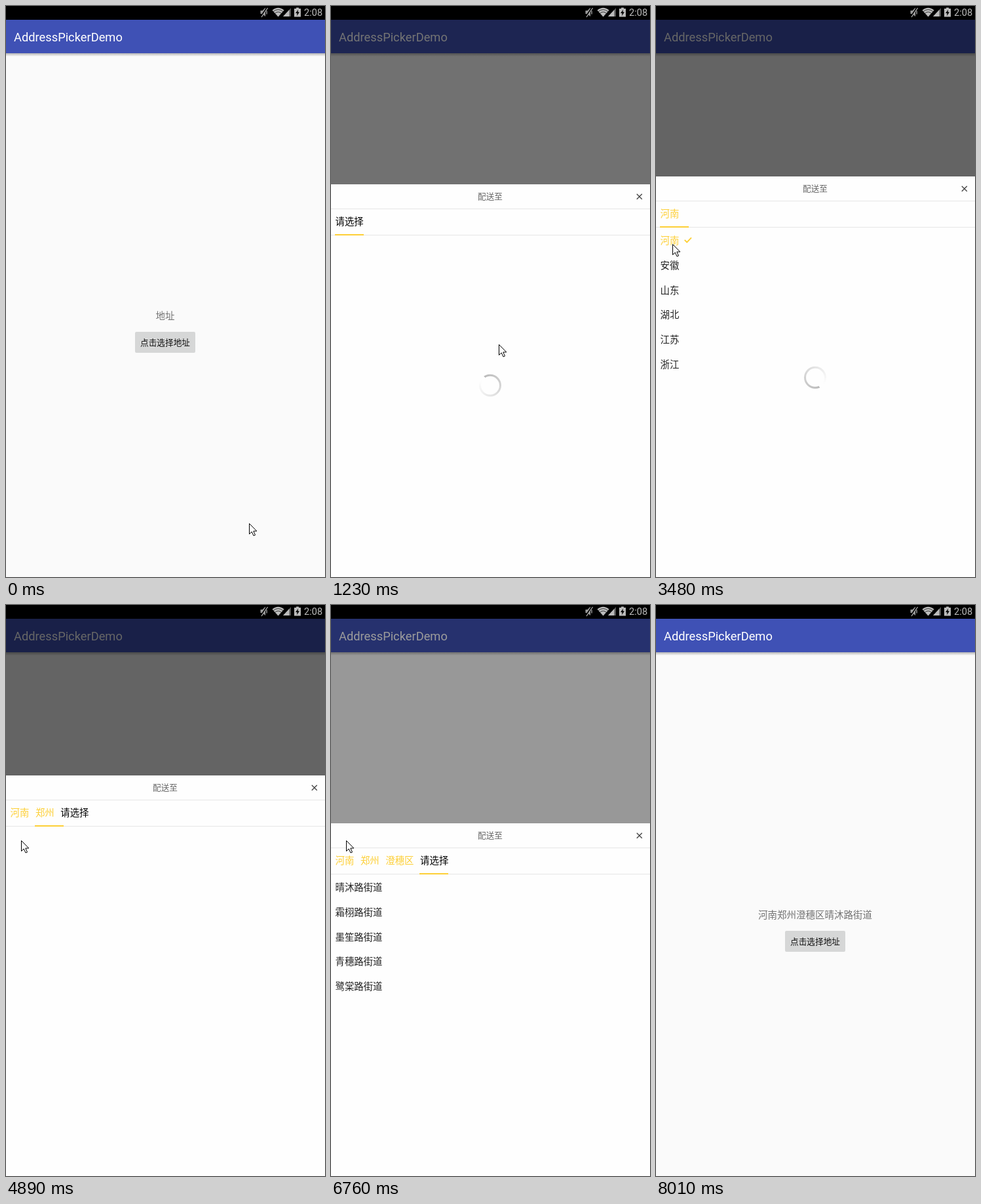
An HTML page with a canvas that plays this animation: 487x871 px, repeating every 8410 ms.

```html
<!DOCTYPE html>
<html lang="zh-CN">
<head>
<meta charset="utf-8">
<title>AddressPickerDemo</title>
<style>
html, body { margin: 0; width: 100%; height: 100%; overflow: hidden; background: #fafafa; }
canvas { display: block; }
</style>
</head>
<body>
<canvas id="stage" width="487" height="871"></canvas>
<script>
const W = 487, H = 871, LOOP = 8410;
const c = document.getElementById('stage').getContext('2d');
const CJK = '"Noto Sans CJK SC", "Noto Sans CJK", sans-serif';
const YELLOW = '#fdcf36', PROMPT = '请选择', FONT = 14.4;

// Times in ms
const OPEN = 958, CLOSE = 6692;
const picks = [2540, 3960, 5350];
const replies = [2390, 3490, 4880, 6275];
const chosen = ['河南', '郑州', '澄穗区'];
const address = '河南郑州澄穗区晴沐路街道';
const lists = [
  ['河南', '安徽', '山东', '湖北', '江苏', '浙江'],
  ['郑州', '洛阳', '开封', '新乡', '安阳'],
  ['澄穗区', '霁禾区', '墨棠区', '岚笙区', '青栩区'],
  ['晴沐路街道', '霜栩路街道', '墨笙路街道', '青穗路街道', '鹭棠路街道']
];
const cursorPath = [
  [0, 371, 789], [680, 256, 516], [1240, 256, 516], [1760, 69, 399], [2390, 25, 363],
  [3500, 25, 363], [3640, 23, 359], [6800, 23, 359], [7530, 289, 553], [8000, 487, 871]
];

const clamp = v => Math.max(0, Math.min(1, v));
const ease = v => (1 - Math.cos(Math.PI * clamp(v))) / 2;
const passed = (times, t) => times.filter(time => t >= time).length;

function rect(x, y, w, h, color) {
  c.fillStyle = color;
  c.fillRect(x, y, w, h);
}

function text(str, x, baseline, size, color, align = 'left', family = CJK) {
  c.font = `${size}px ${family}`;
  c.textAlign = align;
  c.fillStyle = color;
  c.fillText(str, x, baseline);
}

// Chinese text centred vertically on y
function label(str, x, y, size, color, align) {
  text(str, x, Math.round(y + size * 0.38), size, color, align);
}

function shape(d, fill, stroke, width = 1) {
  const path = new Path2D(d);
  if (fill) { c.fillStyle = fill; c.fill(path); }
  if (stroke) { c.strokeStyle = stroke; c.lineWidth = width; c.stroke(path); }
}

function statusBar() {
  const gray = '#bcbcbc';
  rect(0, 0, W, 21, '#000');
  shape('M388.5 12V7H391.5L396 2.5V16L391.5 12Z', '#9a9a9a');
  shape('M399 2L389 17', null, '#000', 2.6);
  shape('M399.5 3L390 17M398 7.5V12.5', null, gray, 1.2);
  shape('M406.5 6.5Q415.5 -1 424.5 6.5L415.5 16.5Z', gray);
  shape('M408 8.5Q415.5 2.5 423 8.5M410.5 11.2Q415.5 7 420.5 11.2', null, '#000', 0.7);
  shape('M423 16H435V3Z', '#555');
  shape('M423 16H432.5V5.7Z', gray);
  shape('M440 4H443V2.5H447V4H450V16.5H440Z', gray);
  shape('M446 5.5L442 11H444.5L444 15L448 9.3H445.5Z', '#000');
  text('2:08', 455, 15.3, 14.6, gray, 'left', 'Roboto, sans-serif');
}

function page(t) {
  rect(0, 0, W, H, '#fafafa');
  const shadow = c.createLinearGradient(0, 72, 0, 77);
  shadow.addColorStop(0, 'rgba(0,0,0,.28)');
  shadow.addColorStop(1, 'rgba(0,0,0,0)');
  rect(0, 72, W, 5, shadow);
  rect(0, 21, W, 51, '#3f51b5');
  text('AddressPickerDemo', 12, 53.7, 18.3, '#fff', 'left', 'Roboto, sans-serif');
  label(t < CLOSE ? '地址' : address, 243, 472.7, 14.5, '#737373', 'center');

  c.beginPath();
  c.roundRect(197, 497, 92, 32, 2);
  c.fillStyle = '#d6d7d7';
  c.fill();
  const press = clamp((t - 800) / 150) * clamp((1070 - t) / 80);
  c.fillStyle = `rgba(0,0,0,${0.1 * press})`;
  c.fill();
  label('点击选择地址', 243, 513.3, 12.65, '#111', 'center');
}

function spinner(t, x, y) {
  const head = Math.PI / 2 + (t - 1760) / 891 * 2 * Math.PI;
  const fade = c.createConicGradient(head, x, y);
  fade.addColorStop(0, '#bababa');
  fade.addColorStop(0.9, '#fdfdfd');
  fade.addColorStop(1, '#fff');
  c.strokeStyle = fade;
  c.lineWidth = 3;
  c.beginPath();
  c.arc(x, y, 15.5, 0, 2 * Math.PI);
  c.stroke();
}

function tabStart(index) {
  return chosen.slice(0, index).reduce((x, name) => x + name.length * FONT + 9.6, 6.5);
}

function sheet(t, top) {
  const picked = passed(picks, t), replied = passed(replies, t);
  const level = Math.max(0, replied - 1);
  const waiting = picked >= replied;

  rect(0, top, W, H - top, '#fefefe');
  label('配送至', 243, top + 18.3, 12.6, '#666', 'center');
  c.save();
  c.translate(470.8, top + 18.7);
  shape('M-4 -4L4 4M4 -4L-4 4', null, '#444', 1.3);
  c.restore();
  rect(0, top + 37, W, 1, '#e6e6e6');
  rect(0, top + 77, W, 1, '#e6e6e6');

  chosen.slice(0, picked).forEach((name, i) => label(name, tabStart(i), top + 56.5, FONT, YELLOW));
  if (picked <= level) label(PROMPT, tabStart(picked), top + 56.5, FONT, '#000');

  const from = tabStart(Math.max(0, level - 1)), to = tabStart(level);
  const slide = ease((t - replies[level]) / 300);
  rect(Math.round(from + (to - from) * slide - 0.7), top + 76, 44, 2, YELLOW);

  if (replied && (level === 0 || t >= replies[level] + 65)) {
    lists[level].forEach((name, i) => {
      const y = top + 97.4 + i * 37.85, on = i === 0 && picked > level;
      label(name, 6.5, y, FONT, on ? YELLOW : '#222');
      if (on) {
        c.save();
        c.translate(43, y);
        shape('M.7 -.5L4.2 3L11 -4', null, YELLOW, 1.9);
        c.restore();
      }
    });
  }
  if (waiting) spinner(t, 243, top + 306.8);
}

function cursor(t) {
  const next = cursorPath.findIndex(point => point[0] > t);
  if (next < 1) return;
  const [t0, x0, y0] = cursorPath[next - 1], [t1, x1, y1] = cursorPath[next];
  const k = (t - t0) / (t1 - t0);
  c.save();
  c.translate(Math.round(x0 + (x1 - x0) * k) + 0.5, Math.round(y0 + (y1 - y0) * k) + 0.5);
  shape('M0 0V16L3.7 12.5L6.5 18.5L9 17.5L6.3 11.5H11.3Z', '#fff', '#000');
  c.restore();
}

function draw() {
  const t = performance.now() % LOOP;
  page(t);
  const closing = clamp((t - CLOSE) / 200);
  const shown = ease((t - OPEN) / 300) - closing ** 2;
  const dim = clamp((t - OPEN) / 300) - closing;
  if (dim > 0) {
    rect(0, 21, W, H - 21, `rgba(0,0,0,${0.6 * dim})`);
    sheet(t, Math.round(H - 611 * shown));
  }
  statusBar();
  cursor(t);
  requestAnimationFrame(draw);
}
draw();
</script>
</body>
</html>
```
